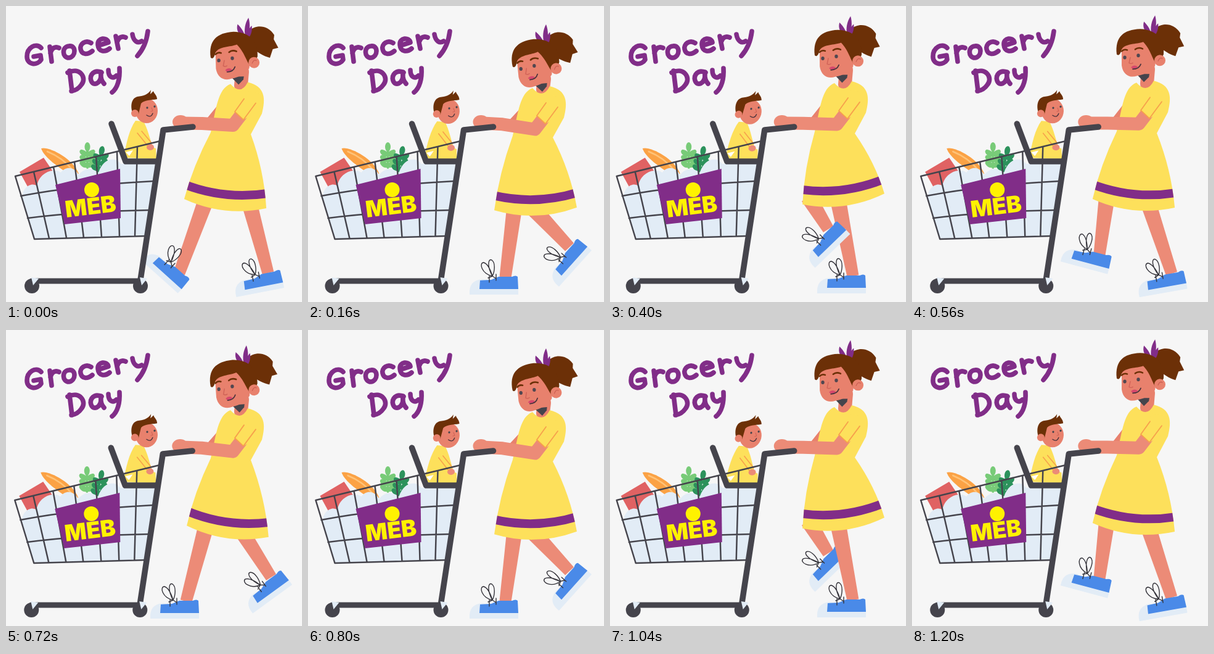
Recreate the animation shown at these times as an HTML page with a canvas. Size 480 by 480 pixels, loop 1280 ms.

```html
<!DOCTYPE html>
<html lang="en">
<head>
<meta charset="utf-8">
<title>Grocery Day</title>
<style>
html, body { margin: 0; width: 100%; height: 100%; overflow: hidden; background: #f6f6f6; }
canvas { display: block; width: 100%; height: 100%; }
</style>
</head>
<body>
<canvas id="stage" width="480" height="480" role="img" aria-label="Grocery Day"></canvas>
<script>
const ctx = document.getElementById('stage').getContext('2d');
const LOOP = 1280, STEP = 640, TICK = 80;
const C = {
  bg: '#f6f6f6', ink: '#45444c', pale: '#e2ecf6', purple: '#812d88', yellow: '#fde05b',
  limb: '#ec8b77', face: '#e8816d', hair: '#6c3007', blue: '#4a8ae8', orange: '#f7a04c',
  red: '#e06263', lip: '#d6486c', sign: '#fff200'
};
const rad = a => a * Math.PI / 180;
const mix = (a, b, k) => a + (b - a) * k;

// periodic Catmull-Rom through evenly spaced keys
function track(keys, t, period) {
  const n = keys.length, u = ((t / period) % 1 + 1) % 1 * n, i = Math.floor(u), f = u - i;
  const [a, b, c, d] = [-1, 0, 1, 2].map(k => keys[(i + k + n) % n]);
  return b + f / 2 * (c - a + f * (2 * a - 5 * b + 4 * c - d + f * (3 * (b - c) + d - a)));
}

const BOB = [.28, .68, 1, .76, .38, .1, 0, .02];
const HEM_Y = [320.5, 326.5, 329, 323, 317, 313, 314, 320];
const HEM_TILT = [6.4, 8, -2, -5, -7, -7.6, -3, 6];
const LEG = {
  x: [284, 295, 323, 360, 379, 397, 413, 424, 428, 433, 427, 411, 388, 357, 327, 307],
  y: [433, 440, 440, 442, 440, 438, 437, 434, 433, 401, 391, 368, 358, 362, 378, 403],
  turn: [42, 0, 0, 0, 0, 0, -3, -10, -11, -36, -48, -66, -60, -44, -15, 15],
  kx: [326, 326, 337, 357, 363, 369, 374, 380, 392, 373, 362, 357, 340, 322, 318, 316],
  ky: [310, 312, 310, 310, 310, 310, 308, 310, 310, 312, 325, 327, 318, 310, 312, 310]
};

function fill(d, color) { ctx.fillStyle = color; ctx.fill(new Path2D(d)); }
function line(d, color, w) {
  ctx.strokeStyle = color;
  ctx.lineWidth = w;
  ctx.stroke(new Path2D(d));
}
function oval(x, y, rx, ry, color) {
  ctx.fillStyle = color;
  ctx.beginPath();
  ctx.ellipse(x, y, rx, ry, 0, 0, 7);
  ctx.fill();
}
function group(draw) { ctx.save(); draw(); ctx.restore(); }

function title() {
  line('M57 68C49 59 34 67 34 82C34 96 51 97 57 87L56 80L45 82' +
    'M71 66L74 90M72 76C74 68 80 65 86 68' +
    'M102 65C90 66 91 84 102 84C114 82 114 63 102 65Z' +
    'M138 60C129 54 119 62 121 70C123 80 133 79 140 73' +
    'M150 64L166 59C164 50 148 51 149 63C150 75 161 75 168 69' +
    'M178 49L182 69M180 59C182 51 188 48 194 51' +
    'M205 46C207 58 214 61 220 57M230 41C228 58 222 71 213 81' +
    'M103 105L107 138M100 108C120 98 132 117 122 128C118 134 112 137 106 138' +
    'M155 108C143 102 135 112 138 121C141 131 154 126 154 112M154 107C153 116 155 122 159 126' +
    'M166 104C166 115 173 119 179 113M184 101C185 118 181 133 172 140', C.purple, 7.6);
}

function shoe(x, y, turn) {
  group(() => {
    ctx.translate(x, y);
    ctx.rotate(rad(turn));
    fill('M-40 3C-52 4-60 9-61 22L-61 28L18 28L18 16Z', C.pale);
    fill('M-44 5L-26 4L-14 -1L8 -1Q14 -4 17 -1L18 19L-45 19Z', C.blue);
    line('M-24 -2C-42 -6-46 -24-38 -24C-32 -22-27 -12-24 -2C-33 -18-31 -31-25 -28C-19 -24-20 -10-24 -2' +
      'L-18 2M-24 -2L-31 1M-29 -2L-29 8M-18 -5L-18 5', '#34333a', 1.4);
  });
}

function leg(t) {
  const at = k => track(LEG[k], t, LOOP);
  const x = at('x'), y = at('y'), kx = at('kx'), ky = at('ky'), ax = x - 3;
  const len = Math.hypot(ax - kx, y - ky), nx = (ky - y) / len, ny = (ax - kx) / len;
  ctx.fillStyle = C.limb;
  ctx.beginPath();
  ctx.moveTo(kx + nx * 13, ky + ny * 13);
  ctx.lineTo(ax + nx * 9.5, y + ny * 9.5);
  ctx.lineTo(ax - nx * 9.5, y - ny * 9.5);
  ctx.lineTo(kx - nx * 13, ky - ny * 13);
  ctx.fill();
  shoe(x, y, at('turn'));
}

function dress(t, d) {
  const cx = 369 - 13.5 * Math.cos(2 * Math.PI * t / STEP);
  const cy = track(HEM_Y, t, STEP), a = rad(track(HEM_TILT, t, STEP));
  const hx = 67 * Math.cos(a), hy = 67 * Math.sin(a);
  const lx = cx - hx, ly = cy - hy, rx = cx + hx, ry = cy + hy, wy = 203 + d * .8;
  const p = new Path2D();
  p.moveTo(364, 124 + d);
  p.bezierCurveTo(343, 132 + d, 341, 165 + d, 332, wy);
  p.quadraticCurveTo(mix(332, lx, .5) - 7, mix(wy, ly, .5), lx, ly);
  p.quadraticCurveTo(cx - 20 * Math.sin(a), cy + 22, rx, ry);
  p.quadraticCurveTo(mix(397, rx, .5) + 9, mix(wy, ry, .5), 397, wy + 3);
  p.lineTo(415, 172 + d);
  p.bezierCurveTo(421, 148 + d, 421, 128 + d, 392, 121 + d);
  p.quadraticCurveTo(381, 143 + d, 364, 124 + d);
  ctx.fillStyle = C.yellow;
  ctx.fill(p);
  group(() => {
    ctx.clip(p);
    ctx.translate(cx, cy - 24);
    ctx.rotate(a);
    line('M-75 -2Q0 20 75 -2', C.purple, 14);
  });
}

function arm(s, d) {
  line(`M${286 + s} 190L${318 + s} ${190 + d * .2}L368 ${191 + d}L391 ${161 + d}`, C.limb, 21);
  oval(283 + s, 188, 13, 11, C.limb);
  group(() => {
    ctx.translate(0, d);
    fill('M389 135L371 169L385 182L416 165L416 140Z', C.yellow);
    line('M386 148L371 169L385 182M405 155L385 182', C.orange, 1.8);
  });
}

function head(q, s) {
  group(() => {
    ctx.translate(356, 81 + 18 * q);
    ctx.rotate(rad(-5.5 * q));
    ctx.translate(-356, -81);
    group(() => {
      ctx.translate(s, 0);
      fill('M388 54C388 28 422 20 436 44L435 51L442 65L433 67L428 81C418 78 408 72 400 64Z', C.hair);
      fill('M389 49C378 43 374 34 377 25C384 32 388 40 389 46C387 34 389 24 395 15C398 25 397 38 392 47' +
        'C393 38 396 31 400 28C401 37 398 45 392 50Z', C.purple);
    });
    fill('M364 110L385 110L384 115L376 123Z', C.ink);
    fill('M340 66L340 96C342 111 353 117 365 113C378 111 388 105 394 97L400 60L360 50Z', C.face);
    fill('M340 70C338 78 335 81 332 78C329 50 343 38 370 37C398 38 410 56 408 78L400 96' +
      'C390 92 390 74 375 58C364 62 346 60 340 70Z', C.hair);
    oval(402, 88, 9, 9, C.face);
    line('M399 89Q402 82 406 85', '#c95e52', 1.2);
    oval(345, 83, 2.7, 3, '#514750');
    oval(367, 80, 2.7, 3, '#514750');
    line('M340 73Q344 69 349 71M362 70Q367 66 374 69', C.hair, 2.6);
    line('M354 83L352 92Q355 94 358 92', '#cf6257', 1.4);
    fill('M355 99Q360 94 366 98Q363 104 358 102Z', C.lip);
    line('M358 102Q368 102 371 94', '#49333d', 1.7);
  });
}

function baby(s) {
  group(() => {
    const k = s / 80;
    ctx.transform(1, 0, k, 1, -165 * k, -.4 * s);
    fill('M210 186C200 200 195 222 191 246L244 248L243 231L238 229C233 214 230 200 223 187Z', C.yellow);
    fill('M194 237L206 234L200 243Z', '#fff');
    oval(234, 229, 6, 5, C.limb);
    line('M213 206L230 227M220 203L236 222', C.orange, 1.6);
    oval(228, 170, 18, 20, C.face);
    fill('M207 178C201 165 202 150 213 147C222 146 230 144 235 136L234 143L239 138' +
      'C240 142 245 145 245 151C234 153 225 152 219 158L215 175Z', C.hair);
    oval(209, 174, 6, 6, C.face);
    oval(229, 165, 1.6, 1.8, C.ink);
    oval(241, 163, 1.6, 1.8, C.ink);
    line('M228 177Q235 182 238 174', '#49333d', 1.3);
    line('M236 165L238 170L235 171', '#cf6257', 1);
  });
}

function leaf(x, y, a, size, color) {
  group(() => {
    ctx.translate(x, y);
    ctx.rotate(rad(a));
    oval(0, -size, size * .6, size, color);
  });
}
function herb(x, y, lean, color) {
  line(`M${x} ${y + 40}L${x + lean} ${y + 8}`, color, 4);
  leaf(x + lean, y + 14, lean * 2, 7.5, color);
  for (let i = 0; i < 3; i++) {
    const cx = x + lean * (1 - i / 3), cy = y + 21 + i * 9;
    leaf(cx, cy, -54, 7.5, color);
    leaf(cx, cy, 54, 7.5, color);
  }
}

function groceries() {
  fill('M22 269L61 246L76 268L39 300Z', C.red);
  fill('M57 231C68 227 108 246 118 272L104 274C86 262 62 246 57 231Z', '#fba245');
  line('M67 236Q92 246 108 266', '#ffc378', 2.5);
  herb(132, 222, 0, '#78cb78');
  herb(149, 228, 5, '#2c925c');
  fill('M27 312C25 294 42 285 50 292C54 268 80 262 89 270C98 258 112 262 118 274' +
    'C128 260 142 264 150 270C158 246 178 244 186 256L246 254L228 372L46 377Z', C.pale);
}

function sign() {
  fill('M80 290L185 264L186 344L95 354Z', C.purple);
  oval(139, 298, 12, 12, C.sign);
  group(() => {
    ctx.translate(137, 325);
    ctx.rotate(rad(-7));
    ctx.fillStyle = C.sign;
    ctx.font = '900 37px Inter, sans-serif';
    ctx.textAlign = 'center';
    ctx.textBaseline = 'middle';
    ctx.fillText('MEB', 0, 2);
  });
}

function cart(s) {
  group(() => { ctx.translate(s, 0); groceries(); });
  baby(s);
  group(() => {
    ctx.translate(s, 0);
    line('M250 219L15 276L46 378L227 373M24 308Q120 290 240 284M35 344Q120 333 233 331' +
      'M45 269L70 377M77 261L98 376M111 253L126 376M146 244L155 375M180 236L184 374M213 228L209 373', C.ink, 2.5);
    sign();
    line('M171 191L194 252L243 252M303 196L255 201L218 444', C.ink, 9.5);
    line('M42 446L218 446', C.ink, 9);
    for (const x of [42, 218]) {
      oval(x, 454, 12, 12, C.ink);
      fill(`M${x - 1} 440L${x + 11} 442L${x + 2} 453Z`, C.pale);
    }
  });
}

function draw(t) {
  const q = track(BOB, t, STEP), d = 9 * q;
  const s = -2.5 * (1 - Math.cos(2 * Math.PI * t / STEP));
  ctx.fillStyle = C.bg;
  ctx.fillRect(0, 0, 480, 480);
  title();
  line(`M${302 + s} 190L331 ${189 + d * .5}L352 ${162 + d}`, C.face, 18);
  leg(t);
  leg(t + STEP);
  line(`M383 ${102 + 16 * q}L381 ${126 + d}`, C.face, 22);
  dress(t, d);
  head(q, s);
  arm(s, d);
  cart(s);
}

ctx.lineCap = ctx.lineJoin = 'round';
function tick() {
  draw(Math.floor(performance.now() % LOOP / TICK) * TICK);
  requestAnimationFrame(tick);
}
tick();
</script>
</body>
</html>
```
